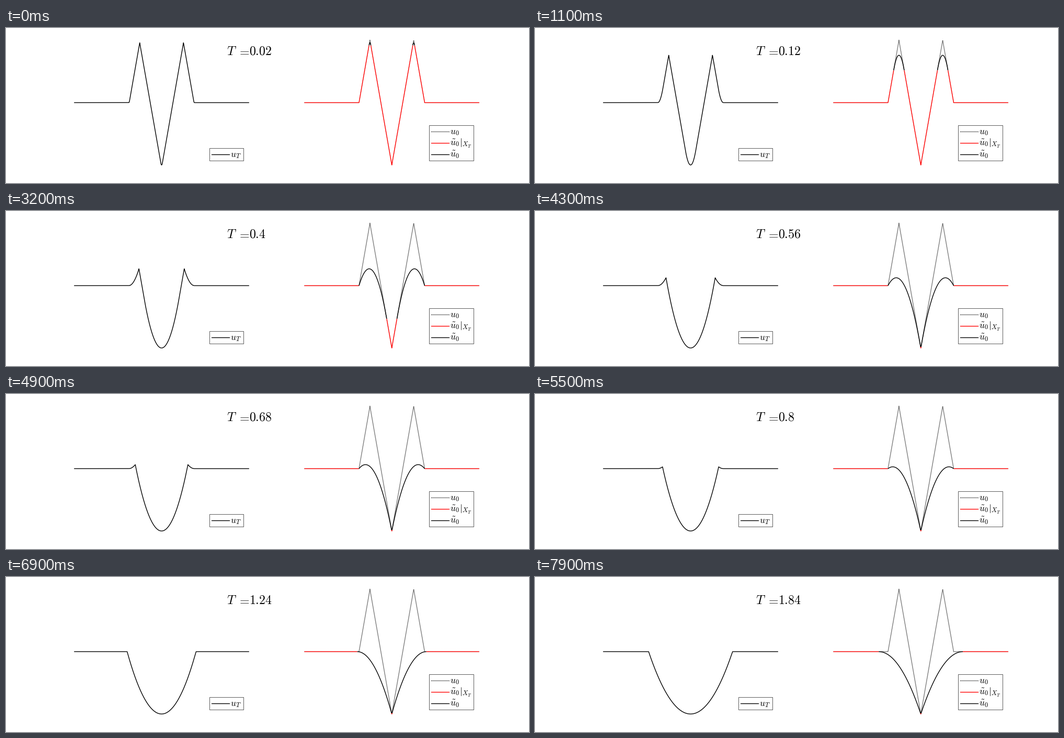
These frames come from a looping animation (1000x298 px, 8000 ms). A matplotlib script:

```python
import numpy as np
import matplotlib.pyplot as plt
from matplotlib.animation import FuncAnimation
from matplotlib.patches import Rectangle

plt.rcParams["mathtext.fontset"] = "cm"

W, H, DPI = 1000, 298, 100
PT = 72 / DPI                    # points per pixel
LOOP, STEP = 8000, 50            # ms
LEFT, RIGHT = 297.5, 737.7       # centre of each plot
SX, SY, Y0 = 41.83, 119.9, 143.5
EDGE = 1.5                       # half width of the initial wave
TIP = 0.01                       # the minimum always stays reachable
LINE = 1.4
DOTS = (0, (0.72, 0.72))

v = np.linspace(0, 4, 4001)
x = np.concatenate([-v[:0:-1], v])
changes = np.concatenate([np.arange(500, 4101, 150), np.arange(4200, 7901, 100)])


def horizon(ms):
    """Time horizon T: steps of 0.02 up to 1, then of 0.06."""
    n = np.searchsorted(changes, ms, side="right")
    return 0.02 * (n + 1) if n < 50 else 1 + 0.06 * (n - 49)


def initial(r):
    return np.where(r < 1, 2 * r - 1, np.maximum(2 * (EDGE - r), 0))


def forward(r, T):
    """Viscosity solution of u_t + u_x^2 / 2 = 0 at time T, for r = |x|."""
    inner = np.where(r < 2 * T, r**2 / (2 * T) - 1, 2 * r - 1 - 2 * T)
    d = np.maximum(EDGE - r, 0)
    outer = np.where(d < 2 * T, d**2 / (2 * T), 2 * d - 2 * T)
    return np.minimum(inner, outer)


def backward(r, T):
    """Reconstructed initial state and the interval hidden by the shock."""
    u = forward(v, T)
    k = np.argmax(u)
    shock = v[k]
    lo = max(shock - 2 * T, TIP)
    hi = max(shock, min(EDGE, shock + 2 * T))
    hidden = (r >= lo) & (r <= hi)
    arc = u[k] - (r - shock) ** 2 / (2 * T)
    return np.where(hidden, arc, initial(r)), hidden


def to_y(u):
    return Y0 - SY * u


fig = plt.figure(figsize=(W / DPI, H / DPI), dpi=DPI, facecolor="white")
ax = fig.add_axes([0, 0, 1, 1])
ax.set_xlim(0, W)
ax.set_ylim(H, 0)
ax.axis("off")


def curve(xs, ys, color="black", style="-", width=LINE):
    return ax.plot(xs, ys, color=color, ls=style, lw=width * PT, snap=False,
                   solid_joinstyle="round", dash_joinstyle="round",
                   solid_capstyle="butt", dash_capstyle="butt")[0]


def label(px, py, tex, size):
    return ax.text(px, py, f"${tex}$", fontsize=size * PT, va="baseline")


def legend(x0, y0, x1, y1, rows):
    ax.add_patch(Rectangle((x0, y0), x1 - x0, y1 - y0, fc="white",
                           ec="#262626", lw=0.75 * PT, zorder=3))
    for i, (tex, color, style) in enumerate(rows):
        y = y1 - 11.5 - 22 * (len(rows) - 1 - i)
        curve([x0 + 4, x0 + 39], [y, y], color, style).set_zorder(4)
        label(x0 + 40.2, y + 4.5, tex, 17.5).set_zorder(4)


r = np.abs(x)
state = curve(LEFT + SX * x, to_y(forward(r, 0.02)))
corners = np.array([-4, -1.5, -1, 0, 1, 1.5, 4])
curve(RIGHT + SX * corners, to_y(initial(np.abs(corners))), style=DOTS)
# a white bed keeps the dots from showing at the rim of the red line
bed = curve(RIGHT + SX * x, to_y(initial(r)), "white", width=2.2)
reached = curve(RIGHT + SX * x, to_y(initial(r)), "red")
filled = curve(RIGHT + SX * x, to_y(initial(r)))

legend(389, 231, 454, 255, [("u_T", "black", "-")])
legend(809, 187, 894, 255, [("u_0", "black", DOTS),
                            (r"\tilde{u}_0|_{X_T}", "red", "-"),
                            (r"\tilde{u}_0", "black", "-")])

label(422.4, 52, "T", 24)
label(442.3, 52, "=", 24)
value = label(465.1, 52, "0.02", 24)


def update(i):
    T = horizon(i * STEP)
    state.set_ydata(to_y(forward(r, T)))
    u, hidden = backward(r, T)
    y = to_y(u)
    for line in (bed, reached):
        line.set_ydata(np.where(hidden, np.nan, y))
    filled.set_ydata(np.where(hidden, y, np.nan))
    value.set_text(f"${T:.4g}$")
    return state, bed, reached, filled, value


anim = FuncAnimation(fig, update, frames=LOOP // STEP, interval=STEP,
                     repeat=True, repeat_delay=0, blit=False)
plt.show()
```
